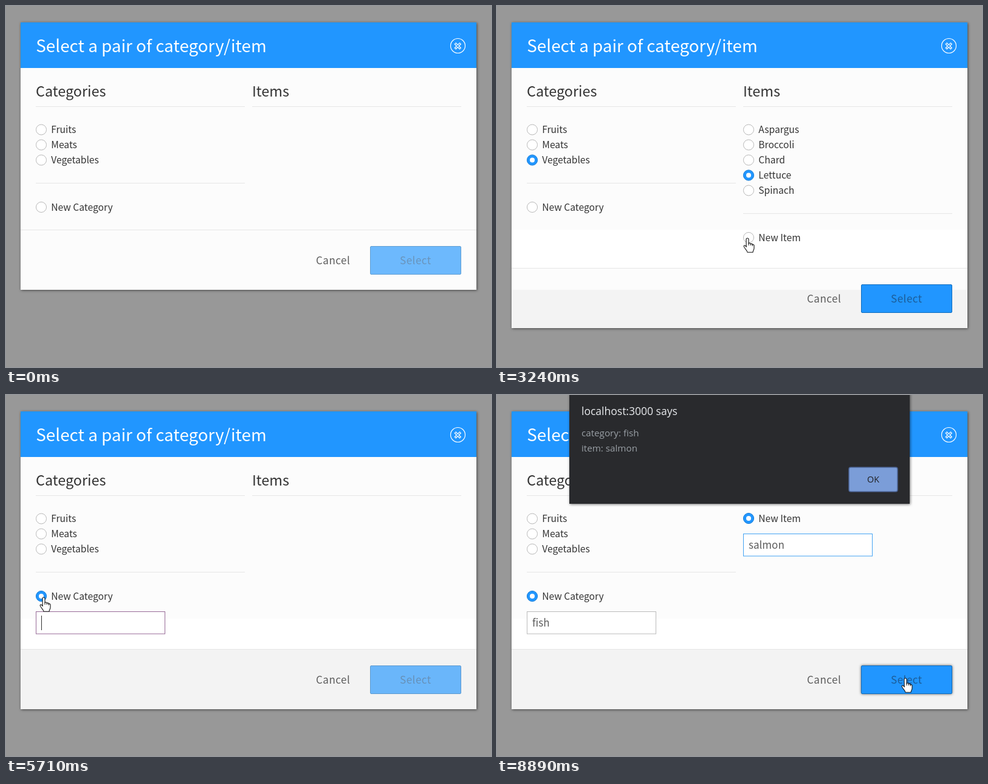
An HTML page that plays this animation: 798 by 594 pixels, repeating every 9250 ms.

```html
<!DOCTYPE html>
<html lang="en">
<head>
<meta charset="utf-8">
<title>Select a pair of category/item</title>
<style>
html, body { margin: 0; width: 100%; height: 100%; overflow: hidden; background: #989898; }
svg { display: block; width: 798px; height: 594px; }
text { font-family: "Noto Sans CJK JP", "Noto Sans CJK SC", "Noto Sans CJK", "Noto Sans", sans-serif; fill: #333; white-space: pre; }
.title { font-size: 27.8px; fill: #fff; }
.heading { font-size: 23.4px; }
.label { font-size: 15.6px; }
.button, .value { font-size: 17px; fill: #5c5c5c; }
.button { letter-spacing: .5px; }
.says, .message, .ok { font-family: "Open Sans", "Noto Sans", sans-serif; }
.says { font-size: 17.5px; fill: #e8eaed; }
.message { font-size: 15.2px; fill: #9aa0a6; }
.ok { font-size: 14.3px; fill: #202124; }
.panel { filter: drop-shadow(1px 1px 2px rgba(0, 0, 0, .55)); }
.glow { filter: drop-shadow(0 0 2px rgba(0, 0, 0, .6)); }
</style>
</head>
<body>
<svg id="stage" viewBox="0 0 798 594"></svg>
<script>
const LOOP = 9250, BLUE = '#2196ff', NEW = 9;
const CATEGORIES = ['Fruits', 'Meats', 'Vegetables'];
const ITEMS = [
  ['Apple', 'Banana', 'Clementine', 'Peach', 'Pear'],
  ['Beef', 'Chicken', 'Lamb', 'Pork'],
  ['Aspargus', 'Broccoli', 'Chard', 'Lettuce', 'Spinach']
];

// [time, selected row]
const CATEGORY_CLICKS = [[0, -1], [550, 0], [1220, 1], [1690, 2], [5690, NEW]];
const ITEM_CLICKS = [[0, -1], [2650, 3], [3500, NEW], [5690, -1], [6970, NEW]];

// [time, x, y] of the pointer tip
const PATH = [
  [40, -8, 240], [300, 30, 215], [480, 62, 200], [650, 62, 201], [970, 62, 223],
  [1200, 62, 225], [1600, 63, 250], [1840, 62, 256], [1890, 110, 258], [1940, 226, 257],
  [2100, 282, 261], [2200, 332, 262], [2400, 368, 272], [2550, 411, 275], [2950, 411, 277],
  [3100, 413, 340], [3240, 412, 382], [4560, 411, 383], [4740, 306, 380], [4840, 236, 376],
  [5100, 140, 366], [5450, 62, 333], [6890, 62, 333], [7000, 224, 333], [7080, 305, 341],
  [7170, 385, 352], [7370, 405, 382], [8200, 405, 382], [8400, 560, 440], [8560, 672, 466],
  [LOOP, 672, 466]
];
const HAND = 'M-2 2a2 2 0 0 1 4 0v6.5c1-1 3-.6 3.2.9c1.2-.8 2.8-.3 3 1.2c1.4-.6 2.8.2 2.8 1.7v4.2c0 3-2 4-2 6.8h-9c0-2.8-4.2-5.6-5.7-9.4c-.7-2 1.6-2.6 2.8-1l1.1 1.6z';
const ARROW = 'M.5.5v16l3.8-3.5 2.6 6 2.7-1.2-2.6-5.8h5z';

const steps = (start, gap, count) => Array.from({ length: count }, (_, i) => start + i * gap);
const FIELDS = {
  potato: { keys: steps(3920, 60, 6), focus: [3500, 5690], color: BLUE },
  fish: { keys: [6120, 6300, 6500, 6890], focus: [5690, 6970], color: '#976a97' },
  salmon: { keys: steps(7670, 90, 6), focus: [6970, 8610], color: '#43a3f3' }
};

const stage = document.getElementById('stage');
const latest = (events, t) => events.filter(e => e[0] <= t).pop()[1];
const clamp = v => Math.max(0, Math.min(1, v));
const rect = (x, y, w, h, fill, more = '') =>
  `<rect x="${x}" y="${y}" width="${w}" height="${h}" fill="${fill}" ${more}/>`;
const text = (x, y, style, value, more = '') =>
  `<text x="${x}" y="${y}" class="${style}" ${more}>${value}</text>`;
const rule = (x, y, w = 344) => rect(x, y, w, 1, '#e6e6e6');

function radio(x, y, label, on) {
  const dot = on
    ? `<circle cx="${x + 9}" cy="${y}" r="8.6" fill="${BLUE}" stroke="#1b7fd8"/><circle cx="${x + 9}" cy="${y}" r="4" fill="#fff"/>`
    : `<circle cx="${x + 9}" cy="${y}" r="8.5" fill="#fff" stroke="#b9b9b9"/>`;
  return dot + text(x + 25.3, y + 5.5, 'label', label);
}

function field(x, y, word, t) {
  const { keys, focus, color } = FIELDS[word];
  const typed = keys.filter(k => k <= t);
  const focused = t >= focus[0] && t < focus[1];
  const blinkStart = typed.length ? typed[typed.length - 1] : focus[0];
  const caret = focused && (t - blinkStart) % 1000 < 500;
  const border = focused || word === 'salmon' ? color : '#bbb';
  return rect(x + .5, y, 212, 36.5, '#fff', `stroke="${border}"`) +
    text(x + 9, y + 24.5, 'value',
      word.slice(0, typed.length) + (caret ? '<tspan class="caret"></tspan>' : '')) +
    (caret ? `<path data-caret="${x + 9}" d="M0 ${y + 6.5}v24" stroke="#333"/>` : '');
}

function choices(x, rows, selected, newLabel, word, t) {
  const newY = rows.length ? 256 + rows.length * 25 : 203;
  return rows.map((r, i) => radio(x, 203.5 + i * 25, r, i === selected)).join('') +
    (rows.length ? rule(x, 216 + rows.length * 25) : '') +
    radio(x, newY, newLabel, selected === NEW) +
    (selected === NEW ? field(x, newY + 25.5, word, t) : '');
}

function footer(y, enabled, t) {
  const early = t < 550;
  const glow = t >= 8610 ? 'class="glow"' : '';
  return rect(24, y, 750, 99, early ? '#fcfcfc' : '#f3f3f3') +
    (!early && t < 3500 ? rect(24, y, 750, 467 - y, '#fcfcfc') : '') +
    rule(24, y, 750) +
    text(510, y + 57, 'button', 'Cancel') +
    `<g opacity="${enabled ? 1 : .65}">` +
    rect(599.5, y + 27.5, 149, 46, BLUE, `rx="1.5" stroke="#0f6cbd" ${glow}`) +
    text(648, y + 57, 'button', 'Select', 'style="fill:#1c5c98"') + '</g>';
}

function dialog(t) {
  return `<g opacity="${clamp((t - 8690) / 200)}">` +
    rect(119, -6, 560, 185, '#292a2d', 'class="panel"') +
    text(139, 33, 'says', 'localhost:3000 says') +
    text(139, 68, 'message', 'category: fish') +
    text(139, 93, 'message', 'item: salmon') +
    rect(579, 119, 80, 40, '#7b9dd8', 'rx="3" stroke="#4d6596" stroke-width="1.5"') +
    text(619, 144, 'ok', 'OK', 'text-anchor="middle"') + '</g>';
}

function pointer(t, bottom, hasItems) {
  if (t < PATH[0][0]) return '';
  const i = PATH.findIndex(p => p[0] > t), [t0, x0, y0] = PATH[i - 1], [t1, x1, y1] = PATH[i];
  const k = (t - t0) / (t1 - t0), x = x0 + (x1 - x0) * k, y = y0 + (y1 - y0) * k;
  const over = (left, right, top, end) => x >= left && x < right && y >= top && y < end;
  const hand = over(49, 393, 191, 266) || over(49, 393, 318, 344) ||
    hasItems && (over(405, 749, 191, 316) || over(405, 749, 368, 394)) ||
    over(599, 749, bottom + 27, bottom + 74);
  return `<path transform="translate(${x} ${y})" d="${hand ? HAND : ARROW}" fill="#fff" stroke="#111" stroke-width="1.1" stroke-linejoin="round"/>` +
    (hand ? `<path transform="translate(${x} ${y})" d="M2 8v4M5.2 9v3M8.2 10v3" stroke="#111"/>` : '');
}

function render(t) {
  const category = latest(CATEGORY_CLICKS, t), item = latest(ITEM_CLICKS, t);
  const rows = ITEMS[category] || [];
  const word = category === NEW ? 'salmon' : 'potato';
  const enabled = item === NEW ? t >= FIELDS[word].keys[0] : item >= 0;
  const itemsBottom = rows.length ? 307 + rows.length * 25 + (item === NEW ? 37 : 0) : 0;
  const bottom = Math.max(category === NEW ? 418 : 368, itemsBottom - .5 | 0);

  stage.innerHTML =
    rect(24, 27, 750, bottom + 72, '#fcfcfc', 'class="panel"') +
    rect(24, 27, 750, 75, BLUE) +
    text(49.3, 76, 'title', 'Select a pair of category/item') +
    '<g fill="none" stroke="#fff"><circle cx="743.5" cy="65.5" r="12" stroke-width="1.2"/>' +
    '<path id="cross" d="M738.8 61.3l9 9m0-9l-9 9" stroke-width="4"/>' +
    `<path d="M739.5 62l7.6 7.6m0-7.6l-7.6 7.6" stroke="${BLUE}" stroke-width="1.3"/></g>` +
    rect(24, 368, 750, bottom - 368, '#fff') +
    text(49, 149, 'heading', 'Categories') + rule(49, 165) +
    text(405, 149, 'heading', 'Items') + rule(405, 165) +
    choices(49, CATEGORIES, category, 'New Category', 'fish', t) +
    (rows.length || item === NEW ? choices(405, rows, item, 'New Item', word, t) : '') +
    footer(bottom, enabled, t) +
    (t >= 8690 ? dialog(t) : '') +
    pointer(t, bottom, rows.length > 0);

  // Carets sit right after the typed text.
  stage.querySelectorAll('[data-caret]').forEach(caret => {
    const width = caret.previousElementSibling.getComputedTextLength();
    caret.setAttribute('transform', `translate(${Math.round(+caret.dataset.caret + width) + .5} 0)`);
  });
}

let shown;
function tick() {
  const t = performance.now() % LOOP;
  const step = Math.max(0, Math.floor((t - 40) / 50) * 50 + 40);
  if (step !== shown) render(shown = step);
  requestAnimationFrame(tick);
}
tick();
</script>
</body>
</html>
```
